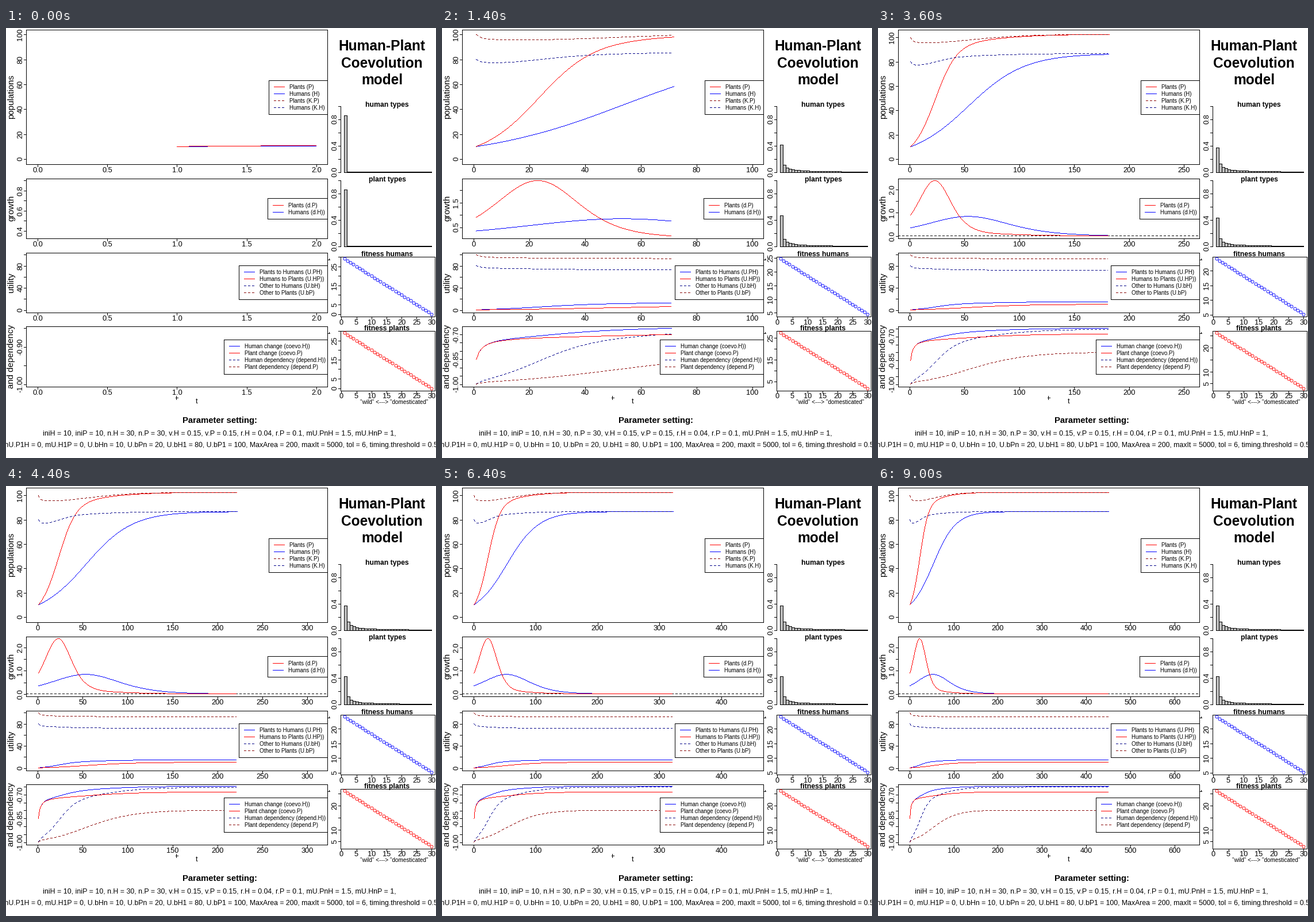
Animation of 748 by 748 pixels, one loop 9100 ms. Source, as a matplotlib script:

```python
import math

import matplotlib.pyplot as plt
import numpy as np
from matplotlib.animation import FuncAnimation
from matplotlib.collections import PolyCollection

plt.rcParams["font.family"] = "Liberation Sans"

SIZE, DPI = 748, 64
PX = 72 / DPI  # points per pixel
HAIR = 0.8 * PX  # stays inside one pixel once snapped
FRAMES, STEP = 91, 5
N = 30
TICK_PX = 12.7
DASH_ON, DASH_LEN = 4, 7
DARKRED, DARKBLUE = "#8B0000", "#00008B"

fig = plt.figure(figsize=(SIZE / DPI, SIZE / DPI), dpi=DPI, facecolor="white")
ax = fig.add_axes([0, 0, 1, 1])
ax.set_xlim(0, SIZE)
ax.set_ylim(SIZE, 0)
ax.axis("off")


# ---- model -----------------------------------------------------------------
def simulate(steps, mut=0.15, r_h=0.04, r_p=0.1):
    """Logistic growth of both populations coupled to replicator dynamics."""
    x = np.linspace(0, 1, N)
    i = np.arange(1, N + 1)
    q_h, q_p = np.eye(N)[0], np.eye(N)[0]
    h = p = 10.0
    keys = "H P KH KP dH dP UPH UHP UbH UbP cH cP depH depP barH barP fitH fitP"
    out = {k: [] for k in keys.split()}
    for _ in range(steps):
        u_ph, u_hp = 1.5 * p * (q_p @ x), h * (q_h @ x)
        b_h, b_p = 80 - 70 * (q_h @ x), 100 - 80 * (q_p @ x)
        k_h, k_p = u_ph + b_h, min(u_hp + b_p, 200)
        f_h = ((N - i) * b_h + i * u_ph) / (b_h + u_ph)
        f_p = ((N - i) * b_p + i * u_hp) / (b_p + u_hp)
        m_h, m_p = ((1 - mut) * q + mut / N for q in (q_h, q_p))
        d_h, d_p = r_h * h * (1 - h / k_h), r_p * p * (1 - p / k_p)
        row = (h, p, k_h, k_p, d_h, d_p, u_ph, u_hp, b_h, b_p,
               2 * (m_h @ x) - 1, 2 * (m_p @ x) - 1,
               (u_ph - b_h) / (u_ph + b_h), (u_hp - b_p) / (u_hp + b_p),
               m_h, m_p, f_h, f_p)
        for series, value in zip(out.values(), row):
            series.append(value)
        q_h, q_p = m_h * f_h / (m_h @ f_h), m_p * f_p / (m_p @ f_p)
        h, p = h + d_h, p + d_p
    return {k: np.array(v) for k, v in out.items()}


sim = simulate(STEP * FRAMES + 2)


# ---- drawing helpers -------------------------------------------------------
def put(x, y, s, px, ha="center", bold=False, rot=0):
    return ax.text(x, y, s, fontsize=px * PX, ha=ha, va="baseline", rotation=rot,
                   rotation_mode="anchor", zorder=6,
                   fontweight="bold" if bold else "normal")


def line(xs, ys, z=2):
    return ax.plot(xs, ys, color="black", lw=HAIR, antialiased=False, zorder=z,
                   solid_capstyle="butt")[0]


def trace(xs, ys, color, dashed=False, z=2):
    """One-pixel polyline without smoothing, built from unit squares."""
    gaps = np.maximum(np.abs(np.diff(xs)), np.abs(np.diff(ys)))
    along = np.concatenate([[0], np.cumsum(gaps)])
    s = np.arange(0, along[-1], 1.0)
    if dashed:
        s = s[s % DASH_LEN < DASH_ON]
    cells = np.floor(np.column_stack([np.interp(s, along, xs), np.interp(s, along, ys)]))
    corners = np.array([[0, 0], [1, 0], [1, 1], [0, 1]])
    squares = PolyCollection(cells[:, None, :] + corners, facecolors=color,
                             linewidths=0, zorder=z)
    return ax.add_collection(squares, autolim=False)


def frame_box(l, t, r, b, face="none", z=3):
    ax.add_patch(plt.Rectangle((l, t), r - l, b - t, fc=face, ec="black",
                               lw=HAIR, antialiased=False, zorder=z))


def pretty(lo, hi):
    """Round tick positions inside lo..hi, about five intervals."""
    cell = (hi - lo) / 5
    base = 10 ** math.floor(math.log10(cell))
    unit = base
    for mult, bias in ((2, 0.8), (5, 1.7), (10, 0.8)):
        if mult * base - cell < bias * (cell - unit):
            unit = mult * base
    first, last = math.ceil(lo / unit - 1e-7), math.floor(hi / unit + 1e-7)
    digits = max(0, -math.floor(math.log10(unit) + 1e-9))
    return [(k * unit, f"{k * unit:.{digits}f}") for k in range(first, last + 1)]


def text_width(s):
    em = sum({".": 0.278, "-": 0.333}.get(c, 0.556) for c in s)
    return em * 12.6


def visible(ticks, pos):
    """Drop labels that would come too close to the previous one."""
    end = -1e9
    for value, label in ticks:
        along, half = abs(pos(value) - pos(ticks[0][0])), text_width(label) / 2
        if along - half - end >= 9.2:
            end = along + half
            yield value, label


def x_axis(ticks, pos, y):
    xs, ys = [], []
    for value, _ in ticks:
        xs += [pos(value)] * 2 + [np.nan]
        ys += [y, y + 4, np.nan]
    return [line(xs, ys)] + [put(pos(v), y + 14, s, TICK_PX)
                             for v, s in visible(ticks, pos)]


def y_axis(ticks, pos, x):
    xs, ys = [], []
    for value, _ in ticks:
        xs += [x - 4, x, np.nan]
        ys += [pos(value)] * 2 + [np.nan]
    return [line(xs, ys)] + [put(x - 7, pos(v), s, TICK_PX, rot=90)
                             for v, s in visible(ticks, pos)]


class Panel:
    """Boxed plot whose limits are padded by 4 % on each side."""

    def __init__(self, l, t, r, b):
        self.box = l, t, r, b
        frame_box(l, t, r, b)

    def limits(self, x0, x1, y0, y1):
        px, py = 0.04 * (x1 - x0), 0.04 * (y1 - y0)
        self.x0, self.x1, self.y0, self.y1 = x0 - px, x1 + px, y0 - py, y1 + py

    def x(self, v):
        l, _, r, _ = self.box
        return l + (v - self.x0) / (self.x1 - self.x0) * (r - l)

    def y(self, v):
        _, t, _, b = self.box
        return b - (v - self.y0) / (self.y1 - self.y0) * (b - t)

    def x_ticks(self):
        return x_axis(pretty(self.x0, self.x1), self.x, self.box[3])

    def y_ticks(self):
        return y_axis(pretty(self.y0, self.y1), self.y, self.box[0])

    def curve(self, values, color, dashed=False):
        steps = np.arange(1, len(values) + 1)
        return trace(self.x(steps), self.y(np.asarray(values)), color, dashed)


def legend(l, t, b, entries, first):
    frame_box(l, t, 559.5, b, "white", 4)
    for i, (label, color, dashed) in enumerate(entries):
        y = first + 12 * i
        trace([l + 9, l + 27.5], [y, y], color, dashed, z=5)
        put(l + 35.5, y + 3.5, label, 9.8, "left")


# ---- static parts ----------------------------------------------------------
pops, growth, util, dep = [Panel(35.5, t, 559.5, b) for t, b in
                           ((2.5, 236.5), (261.5, 365.5), (390.5, 494.5), (518.5, 623.5))]
fits = [Panel(582.5, t, 746.5, t + 104) for t in (397.5, 526.5)]

legend(457.5, 90.5, 149.5, [("Plants (P)", "red", False), ("Humans (H)", "blue", False),
                            ("Plants (K.P)", DARKRED, True),
                            ("Humans (K.H)", DARKBLUE, True)], 102.5)
legend(455.5, 295.5, 331.5, [("Plants (d.P)", "red", False),
                             ("Humans (d.H))", "blue", False)], 308.5)
legend(405.5, 412.5, 471.5, [("Plants to Humans (U.PH)", "blue", False),
                             ("Humans to Plants (U.HP))", "red", False),
                             ("Other to Humans (U.bH)", DARKBLUE, True),
                             ("Other to Plants (U.bP)", DARKRED, True)], 424.5)
legend(379.5, 541.5, 601.5, [("Human change (coevo.H))", "blue", False),
                             ("Plant change (coevo.P)", "red", False),
                             ("Human dependency (depend.H))", DARKBLUE, True),
                             ("Plant dependency (depend.P)", DARKRED, True)], 553.5)

for mid, name in ((119.5, "populations"), (313, "growth"), (443, "utility"),
                  (571.5, "and dependency")):
    put(13.5, mid, name, 15, rot=90)
for y, word in ((39, "Human-Plant"), (68.5, "Coevolution"), (98, "model")):
    put(654, y, word, 24.5, bold=True)
for y, word in ((137, "human types"), (267, "plant types"),
                (397, "fitness humans"), (526, "fitness plants")):
    put(663, y, word, 12.2, bold=True)

put(332, 653, "t", 12.5)
put(675, 653.5, '"wild" <---> "domesticated"', 10)
put(372.5, 687, "Parameter setting:", 14.9, bold=True)
put(371, 708, "iniH = 10, iniP = 10, n.H = 30, n.P = 30, v.H = 0.15, v.P = 0.15, "
    "r.H = 0.04, r.P = 0.1, mU.PnH = 1.5, mU.HnP = 1,", 12.4)
put(372, 728.5, "mU.P1H = 0, mU.H1P = 0, U.bHn = 10, U.bPn = 20, U.bH1 = 80, "
    "U.bP1 = 100, MaxArea = 200, maxIt = 5000, tol = 6, timing.threshold = 0.5", 12.3)

# stray specks left by clipped axis titles
line([296.5, 296.5], [640, 646])
line([295, 299], [642.5, 642.5])
for y in (402.5, 530.5):
    line([560.5, 563.5], [y, y])
    line([562.5, 562.5], [y - 2, y])

BASES = (250.5, 379.5)
BAR_H = 115
for base in BASES:
    line([582.5, 582.5], [base, base - BAR_H])
    y_axis([(k / 5, f"{k / 5:.1f}") for k in range(6)],
           lambda v, b=base: b - BAR_H * v, 582.5)
for panel in fits:
    panel.limits(1, N, 0, 1)
    x_axis([(k, str(k)) for k in range(0, 31, 5)], panel.x, panel.box[3])

bars = [ax.bar(588 + 5.07 * np.arange(N), np.zeros(N), width=5.07, bottom=base,
               align="edge", fc="#BEBEBE", ec="black", lw=HAIR, antialiased=False, zorder=2)
        for base in BASES]
dots = [ax.plot([], [], "o", ms=5 * PX, mfc="none", mec=c, mew=0.9 * PX, zorder=3)[0]
        for c in ("blue", "red")]
ax.set_xlim(0, SIZE)
ax.set_ylim(SIZE, 0)

# ---- animation -------------------------------------------------------------
live = []


def update(k):
    while live:
        live.pop().remove()
    t = STEP * k + 1
    x_max = math.ceil(1.4 * t)
    now = {key: v[:t] for key, v in sim.items()}
    h, p = sim["H"][:t + 1], sim["P"][:t + 1]

    def span(*keys):
        every = np.concatenate([now[key] for key in keys])
        return every.min(), every.max()

    pops.limits(0, x_max, 0, max(span("KH", "KP")[1], h.max(), p.max()))
    growth.limits(0, x_max, *span("dH", "dP"))
    util.limits(0, x_max, *span("UPH", "UHP", "UbH", "UbP"))
    dep.limits(0, x_max, *span("cH", "cP", "depH", "depP"))

    if growth.y0 < 0:
        zero = growth.y(0)
        live.append(trace([35.5, 559.5], [zero, zero], "black", True, z=1.5))
    live.extend([pops.curve(h, "blue"), pops.curve(p, "red")])
    for panel, key, color, dashed in (
            (pops, "KH", DARKBLUE, True), (pops, "KP", DARKRED, True),
            (growth, "dH", "blue", False), (growth, "dP", "red", False),
            (util, "UbH", DARKBLUE, True), (util, "UbP", DARKRED, True),
            (util, "UPH", "blue", False), (util, "UHP", "red", False),
            (dep, "depH", DARKBLUE, True), (dep, "depP", DARKRED, True),
            (dep, "cH", "blue", False), (dep, "cP", "red", False)):
        if t > 1:
            live.append(panel.curve(now[key], color, dashed))
    for panel in (pops, growth, util, dep):
        live.extend(panel.x_ticks() + panel.y_ticks())

    for group, key in zip(bars, ("barH", "barP")):
        for rect, share in zip(group, sim[key][t - 1]):
            rect.set_height(-BAR_H * share)
    for panel, dot, key in zip(fits, dots, ("fitH", "fitP")):
        fit = sim[key][t - 1]
        panel.limits(1, N, fit.min(), fit.max())
        dot.set_data(panel.x(np.arange(1, N + 1)), panel.y(fit))
        live.extend(panel.y_ticks())
    return live


anim = FuncAnimation(fig, update, frames=FRAMES, interval=100, init_func=lambda: [],
                     repeat=True, repeat_delay=0, blit=False)
plt.show()
```
